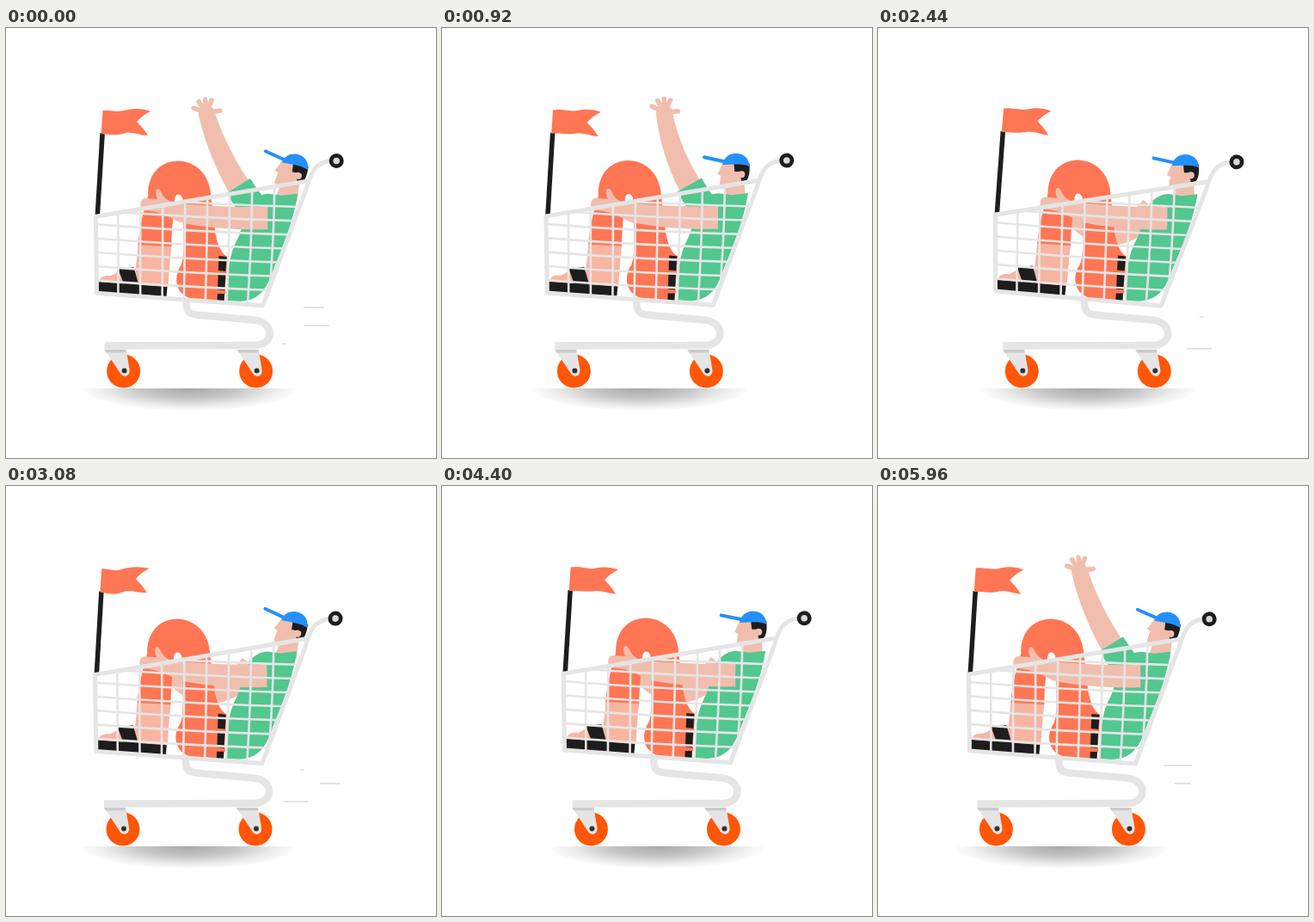
These frames come from a looping animation (500x500 px, 6 s). An HTML page with a canvas:

```html
<!DOCTYPE html>
<html lang="en">
<head>
<meta charset="utf-8">
<title>Trolley ride</title>
<style>
html, body { margin: 0; width: 100%; height: 100%; overflow: hidden; background: #fff; }
canvas { display: block; }
</style>
</head>
<body>
<canvas id="stage" width="500" height="500"></canvas>
<script>
const ctx = document.getElementById('stage').getContext('2d');
const SKIN = '#f1beae', SHIN = '#f8b5a2', ORANGE = '#ff7654', WHEEL = '#ff5707';
const GREEN = '#52c790', BLUE = '#2490fb', BLACK = '#1d1d1d', GREY = '#e5e5e5';
const LOOP = 6000, RIDE = 3000, RISE = 1900, REACH = 50;

const mod = (a, n) => (a % n + n) % n;
const mix = (a, b, u) => a.map((v, i) => v + (b[i] - v) * u);
const sineEase = u => (1 - Math.cos(Math.PI * u)) / 2;
const ramp = (t, from, to) => sineEase(Math.min(1, Math.max(0, (t - from) / (to - from))));

// The cart rolls slowly right, quickly back left, leaning as it returns
function ride(t) {
  const s = mod(t - 80, RIDE);
  const back = Math.max(0, (s - RISE) / (RIDE - RISE));
  const go = s < RISE ? sineEase((s / RISE) ** 1.12) : 1 - sineEase(back);
  return {
    x: REACH * go,
    lift: -1.4 * go,
    tilt: .7 * Math.sin(Math.PI * back) - .3 * (1 - go),
    nod: 13.5 * Math.max(0, 1 - 2.5 * go) ** 1.5
  };
}

// The hidden arm rises, waves from side to side and sinks again
function armPose(t) {
  const s = t > LOOP / 2 ? t - LOOP : t;
  const raise = ramp(s, -900, -520) * (1 - ramp(s, 1740, 2200));
  const wave = sineEase(2 * (s + 10) / 1100) * raise ** 2;
  const palm = mix([180, 205], mix([233, 99], [274, 98], wave), raise);
  const elbow = mix([236, 275], mix([249, 157], [253, 148], wave), raise);
  elbow[0] -= 60 * raise * (1 - raise);
  return { elbow, palm, raise, angle: 22 * wave - 50 * (1 - raise) };
}

function fill(path, color) {
  ctx.fillStyle = color;
  ctx.fill(new Path2D(path));
}

function stroke(path, color, width, cap = 'round') {
  ctx.strokeStyle = color;
  ctx.lineWidth = width;
  ctx.lineCap = cap;
  ctx.lineJoin = 'round';
  ctx.stroke(new Path2D(path));
}

function disc(x, y, r, color) {
  ctx.fillStyle = color;
  ctx.beginPath();
  ctx.arc(x, y, r, 0, 7);
  ctx.fill();
}

function turned(x, y, degrees, draw) {
  ctx.save();
  ctx.translate(x, y);
  ctx.rotate(degrees * Math.PI / 180);
  ctx.translate(-x, -y);
  draw();
  ctx.restore();
}

// Tapered band along a quadratic curve, up to parameter `end`
function limb(p, q, r, w0, w1, end, color) {
  const left = [], right = [];
  for (let i = 0; i <= 24; i++) {
    const u = end * i / 24, w = (w0 + (w1 - w0) * u) / 2;
    const a = mix(p, q, u), b = mix(q, r, u), [x, y] = mix(a, b, u);
    const dx = b[0] - a[0], dy = b[1] - a[1], k = w / Math.hypot(dx, dy);
    left.push([x - dy * k, y + dx * k]);
    right.unshift([x + dy * k, y - dx * k]);
  }
  fill('M' + [...left, ...right].join('L') + 'Z', color);
}

function shadow() {
  ctx.save();
  ctx.beginPath();
  ctx.rect(80, 419, 270, 40);
  ctx.clip();
  ctx.translate(213, 419);
  ctx.scale(1, .21);
  const g = ctx.createRadialGradient(0, 0, 0, 0, 0, 124);
  g.addColorStop(0, '#a8a8a8');
  g.addColorStop(.45, '#c6c6c6');
  g.addColorStop(.8, '#ececec');
  g.addColorStop(1, '#fcfcfc');
  disc(0, 0, 124, g);
  ctx.restore();
}

function chassis() {
  stroke('M209,317C208,331 213,333 225,334L288,339.5C312,342 312,369 288,369L114,369.5', GREY, 8.5, 'butt');
  for (const x of [136, 290]) {
    disc(x, 399, 19.5, WHEEL);
    fill(`M${x - 22},374H${x + 3}L${x + 7},397C${x + 8},406 ${x - 1},407 ${x - 4},401Z`, GREY);
    fill(`M${x - 22},374H${x + 3}V377.5H${x - 20}Z`, '#cbcbcb');
    disc(x + 1, 398.5, 3, '#333');
  }
}

function flag(t) {
  stroke('M106,217L112,122', BLACK, 5.5, 'butt');
  const wave = k => 1.5 * Math.sin(t * Math.PI / 250 - k);
  const a = wave(0), b = wave(2), c = wave(3);
  fill(`M112.500,95.500C122,${95 + a} 128,${98 + a} 138,${97 + b}C150,${94 + b} 160,${95 + b} 168,${97 + c}` +
    `Q158,${102 + c} 152,${109 + c}Q160,${117 + c} 165,${125 + c}` +
    `C155,${126 + b} 150,${122 + b} 140,${123 + b}C128,${126 + a} 120,${123 + a} 110.500,123Z`, ORANGE);
}

function wavingArm({ elbow, palm, raise, angle }) {
  const shoulder = [287, 209], [x, y] = palm;
  limb(shoulder, elbow, palm, 29, 19, 1, SKIN);
  limb(shoulder, elbow, palm, 33, 30, .24 * raise ** 2, GREEN);
  disc(x, y, 9.5, SKIN);
  for (const finger of [-68, -34, -5, 22, 80])
    turned(x, y, angle + finger, () => stroke(`M${x},${y}V${y - 16}`, SKIN, 5.5));
}

function head(angle) {
  turned(330, 210, angle, () => {
    fill('M309,158L303,171L307,173L305.500,184C307,188 311,187 313,187L311,200H336L334,178L337,158Z', SKIN);
    fill('M322,158H340C341,167 340,174 337,178L331,179L329,168H323Z', BLACK);
    disc(331, 171, 4, SKIN);
    fill('M309,160C311,142 340,142 340,162C332,158 322,160 309,160Z', BLUE);
    stroke('M287.500,151.500L314,157', BLUE, 4);
  });
}

function legs() {
  fill('M153,251L192,253C190,272 189,285 188,301L146,298C150,285 152,270 153,251Z', SHIN);
  fill('M108,297C107,289 114,287 121,288C127,285 130,283 136,280L150,298Z', SHIN);
  fill('M130,280L148,278L154,299L137,299Z', BLACK);
  fill('M107,295L187,301L186,312L107,307Z', BLACK);
  fill('M165,195C163,141 235,141 238,195L243,238C246,254 250,262 257,266L253,318L222,316' +
    'C196,314 193,290 203,276C208,265 206,235 205,198C203,192 197,192 196,198C194,220 192,238 192,254' +
    'L153,252C155,230 160,210 165,195Z', ORANGE);
  fill('M247,265L256,266L253,318L245,317Z', BLACK);
  fill('M245,282L256,283V287H245ZM244,304L255,305V309H244Z', ORANGE);
}

function shirt() {
  fill('M257,317C256,290 258,264 269,245C277,230 275,206 292,197Q298,193 305,193L320,195L339,193' +
    'C333,230 318,262 309,285C302,305 292,318 270,318Z', GREEN);
}

function frontArm() {
  fill('M304,208V234.500C270,235 232,233 202,226C185,217 172,212 160,212C154,210 155,199 161,198L176,199' +
    'C171,189 176,183 180,190C183,197 187,201 194,203C230,207 270,209 304,208Z', SKIN);
}

function basket() {
  ctx.save();
  ctx.clip(new Path2D('M104,219L350,178L298,323L105,308Z'));
  for (let i = 1; i < 9; i++) {
    const x = 104 + 26 * i;
    stroke(`M${x},170Q${x},240 ${x - .12 * i * i},325`, GREY, 2.6);
  }
  for (let i = 0; i < 7; i++) {
    const y = 195 + 16.3 * i;
    stroke(`M100,${y}Q220,${y + 10} 360,${y + 14}`, GREY, 2.6);
  }
  ctx.restore();
  stroke('M349,178.500L104,219L105,308L298,323L349,187C354,170 358,157 378,155', GREY, 5);
  disc(384, 155, 8.5, BLACK);
  disc(384, 155, 3.8, '#d8d8d8');
}

// Streaks spring up behind the returning cart, one after another
function wind(t) {
  for (let i = -6; i < 4; i++) {
    const start = 2830 + 80 * i;
    const p = mod(t - start, RIDE) / 210;
    if (p >= 1) continue;
    const x = 311 + ride(start).x + (i % 2 ? 31 : 9), y = 325 + mod(21 * i, 58);
    stroke(`M${x + 45 * p ** 4},${y}H${x + 45 * (1 - (1 - p) ** 2)}`, '#e3e3e3', 2, 'butt');
  }
}

function draw(t) {
  const { x, lift, tilt, nod } = ride(t);
  ctx.fillStyle = '#fff';
  ctx.fillRect(0, 0, 500, 500);
  wind(t);
  ctx.save();
  ctx.translate(x, 0);
  shadow();
  chassis();
  ctx.translate(0, lift);
  turned(215, 330, tilt, () => {
    flag(t);
    wavingArm(armPose(t));
    head(nod);
    shirt();
    legs();
    frontArm();
    basket();
  });
  ctx.restore();
}

const begin = performance.now();
function tick() {
  draw((performance.now() - begin) % LOOP);
  requestAnimationFrame(tick);
}
tick();
</script>
</body>
</html>
```
